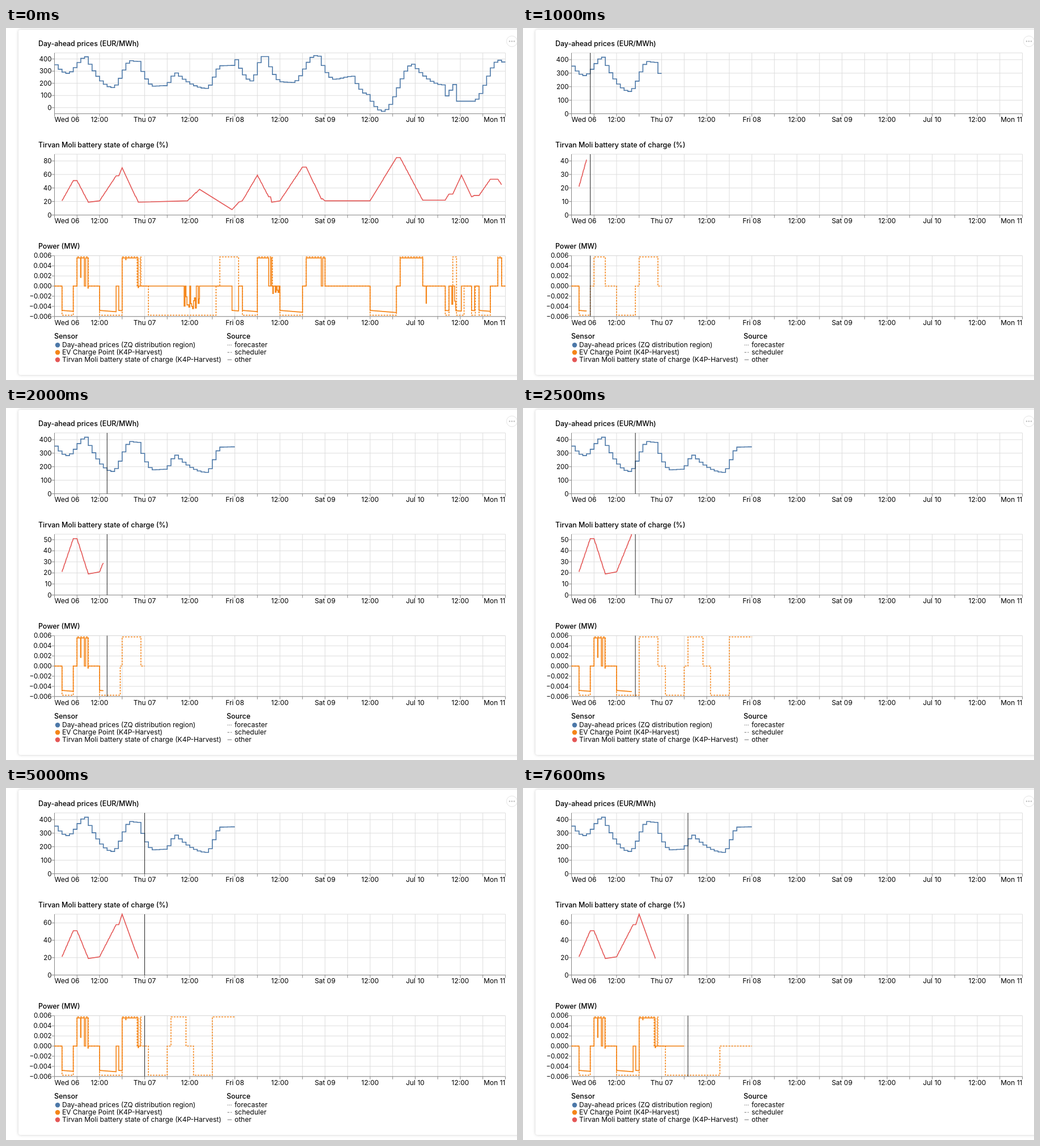
Animation, 901 px wide and 622 px high, one loop 8 s. Source, as an HTML page:

```html
<!DOCTYPE html>
<html lang="en">
<head>
<meta charset="utf-8">
<title>Charging schedule</title>
<style>
  html, body { margin: 0; width: 100%; height: 100%; overflow: hidden; background: #fff; }
  svg { display: block; width: 100%; height: 100%; overflow: hidden; }
  text { font: 12px Inter, "Open Sans", sans-serif; fill: #000; }
  .num { font-size: 11.5px; }
  .title { font-size: 12.4px; font-weight: 500; }
  .line { fill: none; stroke-width: 1.6; }
  .card { fill: #fff; filter: drop-shadow(0 0 2.5px rgba(0, 0, 0, .2)); }
</style>
</head>
<body>
<svg id="stage" viewBox="0 0 901 622"></svg>
<script>
const LOOP = 8000, WEEK = 120;
const LEFT = 85.5, RIGHT = 880.5, HEIGHT = 107.5, TOPS = [44, 223, 402.3];
const BLUE = '#4c78a8', ORANGE = '#f58518', RED = '#e45756', GRID = '#ddd', AXIS = '#888';
const CAR = 'Tirvan Moli', SITE = 'K4P-Harvest', ZONE = 'ZQ distribution region';
const DAYS = ['Wed 06', 'Thu 07', 'Fri 08', 'Sat 09', 'Jul 10', 'Mon 11'];
const stage = document.getElementById('stage');
const hourX = h => LEFT + (RIGHT - LEFT) * h / WEEK;

// how long the rule rests on each hour, in 100 ms; hours 18 and 19 are skipped
const INTRO = 500;
const HOLDS = [1, 2, ...Array(10).fill(1), 2, 2, 1, 2, 11, 3, 5, 3, 3, 5, 3, 4, 3, 3, 3, 5, 4];

function hourAt(t) {
  if (t < INTRO) return WEEK;
  let i = 0, end = INTRO + HOLDS[0] * 100;
  while (t >= end && i < HOLDS.length - 1) end += HOLDS[++i] * 100;
  return i < 17 ? i + 1 : i + 3;
}

// price peaks and valleys: [hour, EUR/MWh]
const TURNS = [[0, 352], [3, 282], [8, 418], [15, 165], [20, 386], [22, 380], [26, 177], [29, 181],
  [32, 285], [40, 158], [44, 345], [47, 347], [48, 394], [52, 220], [55, 420], [56, 420], [60, 213],
  [63, 207], [69, 428], [70, 423], [74, 234], [79, 258], [83, 108], [87, -30], [95, 357], [103, 187],
  [104, 97], [106, 190], [107, 53], [111, 53], [118, 390], [119, 375]];

// prices climb in an S curve and drop fast at first
function price(h) {
  const i = Math.max(1, TURNS.findIndex(p => p[0] >= h));
  const [h1, p1] = TURNS[i - 1], [h2, p2] = TURNS[i];
  const t = (h - h1) / (h2 - h1);
  const eased = p2 > p1 ? (1 - Math.cos(Math.PI * t)) / 2 : 1 - (1 - t) ** 1.8;
  return p1 + (p2 - p1) * eased;
}

// battery sessions: [start hour, end hour, percent at the end, driving]
const RESERVE = 21;
const SESSIONS = [[2, 5, 51], [6, 9, 19], [12, 16.4, 58], [17.1, 18, 70], [18, 22.3, 19],
  [35.4, 38.6, 38], [38.6, 47.25, 8, true], [47.25, 49, 19], [50, 54, 59], [54, 57, 27], [57.5, 57.8, 19],
  [60, 66, 71], [67, 71, 24], [71.4, 72, 21], [84, 91, 85], [92, 98, 22], [104, 105, 31], [106, 108.3, 59],
  [108.3, 111, 27, true], [111, 111.8, 29], [113, 116, 53], [118, 119, 45]];

// whole percents while the battery works; an idle battery settles at its reserve
const socLine = [];
let level = RESERVE, idleFrom = -1;
for (const s of SESSIONS) {
  const [start, end, target, driving] = s;
  if (start - idleFrom >= 1) level = Math.max(level, RESERVE);
  s.up = target > level;
  socLine.push([start, level]);
  if (!driving)
    for (let h = start + 1 / 6; h < end - .1; h += 1 / 6)
      socLine.push([h, Math.round(level + (target - level) * (h - start) / (end - start))]);
  socLine.push([end, target]);
  level = target;
  idleFrom = end;
}

function random(n) {
  const r = Math.sin(n * 12.9898) * 43758.5453;
  return r - Math.floor(r);
}

// short dropouts: [hour, length, kW]; flicker: [start, end, deepest kW]
const DROPS = [[6.95, .1, 1.7], [7.95, .35, 0], [8.9, .1, -.4], [18.95, .1, 5.2], [22.25, .15, -.3], [98.9, .1, -3.4]];
const FLICKER = [[34.5, 38.6, -4.8], [58.1, 59.9, -2], [105.3, 106.8, -4.9]];

function power(h) {
  const drop = DROPS.find(([at, len]) => h >= at && h < at + len);
  if (drop) return drop[2];
  const noisy = FLICKER.find(([from, to]) => h >= from && h < to);
  if (noisy) {
    const r = random(Math.floor(h * 4));
    return r < .4 ? 0 : noisy[2] * r;
  }
  const s = SESSIONS.find(([from, to]) => h >= from && h < to);
  if (!s || s[3]) return 0;
  return s.up ? -4.8 - .06 * (h - s[0]) : 5.55;
}

// planned slots as known at hour `now`: [start, end, kW]
function slots(now) {
  const max = 5.75;
  const list = [[2, 5, -max], [6, 9, max], [12, now < 12 ? 17 : now < 17 ? 17.5 : 18, -max]];
  if (now < 18) list.push([18, 23, max]);
  else list.push([18, 22, max], [22.8, 23, max]);
  if (now === WEEK) {
    list.push([25, 43, -max], [44, 49, max], [106, 107, max]);
    for (const s of SESSIONS)
      if (s[0] >= 50 && !s[3]) list.push([Math.floor(s[0]), Math.ceil(s[1]), s.up ? -max : max]);
  } else if (now >= 31) list.push([25, 39.5, -max]);
  else {
    if (now < 25) list.push([25, 30, -max], [31, 35, max]);
    else list.push([25, Math.min(now + 6, 33), -max]);
    list.push([37, 42, -max], [42, 48, max]);
  }
  return list;
}

// staircase through f, sampled `rate` times an hour
function stairs(f, y, hours, rate) {
  let last = f(0), d = `M${LEFT} ${y(last)}`;
  for (let i = 1; i < hours * rate; i++) {
    const v = f(i / rate);
    if (v !== last) d += `H${hourX(i / rate)}V${y(v)}`;
    last = v;
  }
  return d + `H${hourX(hours)}`;
}

function tickStep(span, count) {
  const raw = span / count, unit = 10 ** Math.floor(Math.log10(raw)), r = raw / unit;
  return unit * (r >= Math.sqrt(50) ? 10 : r >= Math.sqrt(10) ? 5 : r >= Math.SQRT2 ? 2 : 1);
}

function scale(values, top) {
  let lo = -1, hi = 1, step = 2;
  if (values.length) {
    lo = Math.min(0, ...values);
    hi = Math.max(0, ...values);
    const nice = tickStep(hi - lo, 10);
    lo = Math.floor(lo / nice) * nice;
    hi = Math.ceil(hi / nice) * nice;
    step = tickStep(hi - lo, 4);
  }
  const ticks = [];
  for (let v = Math.ceil(lo / step) * step; v <= hi; v += step) ticks.push(v);
  return { ticks, y: v => top + HEIGHT * (hi - v) / (hi - lo) };
}

const line = (x1, y1, x2, y2, color, dash = '') =>
  `<path d="M${x1} ${y1}L${x2} ${y2}" stroke="${color}" stroke-dasharray="${dash}"/>`;
const text = (x, y, s, anchor = 'start', cls = '') =>
  `<text x="${x}" y="${y}" text-anchor="${anchor}" class="${cls}">${s}</text>`;
const curve = (d, color, dash = '') =>
  `<path class="line" d="${d}" stroke="${color}" stroke-dasharray="${dash}"/>`;

function frame(title, top, { ticks, y }, format = String) {
  const bottom = top + HEIGHT;
  let s = text(57, top - 12.5, title, 'start', 'title') + line(LEFT, top, RIGHT, top, GRID);
  for (const v of ticks) {
    s += line(LEFT, y(v), RIGHT, y(v), GRID) + line(LEFT - 5, y(v), LEFT, y(v), AXIS);
    s += text(80.5, y(v) + 4, format(v), 'end', 'num');
  }
  for (let h = 0; h <= WEEK; h += 6) {
    const x = hourX(h);
    s += line(x, top, x, bottom, GRID) + line(x, bottom, x, bottom + 5, AXIS);
    if (h % 12) continue;
    const anchor = h === 0 ? 'start' : h === WEEK ? 'end' : 'middle';
    s += text(x, bottom + 14.8, h % 24 ? '12:00' : DAYS[h / 24], anchor);
  }
  return s + line(LEFT, bottom, RIGHT, bottom, AXIS) + line(LEFT, top, LEFT, bottom, AXIS);
}

function legend(hasSoc) {
  const sensors = [[BLUE, `Day-ahead prices (${ZONE})`], [ORANGE, `EV Charge Point (${SITE})`]];
  if (hasSoc) sensors.push([RED, `${CAR} battery state of charge (${SITE})`]);
  const sources = [['forecaster', '1.6 1.4'], ['scheduler', '3.4 2'], ['other', '']];
  const x = hasSoc ? 389 : 342, rowY = i => 560.2 + 13 * i;
  let s = text(85, 549, 'Sensor', 'start', 'title') + text(x, 549, 'Source', 'start', 'title');
  sensors.forEach(([color, label], i) => {
    s += `<circle cx="91" cy="${rowY(i)}" r="4.2" fill="${color}"/>` + text(99, rowY(i) + 4, label);
  });
  sources.forEach(([label, dash], i) => {
    s += line(x + 1.5, rowY(i), x + 9, rowY(i), '#777', dash) + text(x + 14, rowY(i) + 4, label);
  });
  return s;
}

const card = '<rect class="card" x="22" y="3" width="900" height="610" rx="4"/>';
const menu = '<circle cx="892" cy="23.5" r="9.5" fill="#fff" stroke="#e4e4e4"/>' +
  [888, 892, 896].map(x => `<circle cx="${x}" cy="23.5" r="1.2" fill="#bbb"/>`).join('');

function draw(now) {
  const all = now === WEEK;
  const measured = all ? WEEK : now - 1;
  const priced = all ? WEEK : now < 13 ? 24 : 48;
  const planned = all ? WEEK : now < 15 ? 24 : 48;
  const soc = socLine.filter(p => p[0] <= measured);
  const list = slots(now);
  const plan = h => (list.find(([from, to]) => h >= from && h < to) || [0, 0, 0])[2];

  const a = scale(Array.from({ length: priced }, (_, h) => price(h)), TOPS[0]);
  const b = scale(soc.map(p => p[1]), TOPS[1]);
  const c = scale([-6, 6], TOPS[2]);
  const milli = v => (v < 0 ? '\u2212' : '') + (Math.abs(v) / 1000).toFixed(3);

  let s = card + frame('Day-ahead prices (EUR/MWh)', TOPS[0], a);
  s += curve(stairs(price, a.y, priced, 1), BLUE);
  s += frame(`${CAR} battery state of charge (%)`, TOPS[1], b);
  s += curve(soc.map(([h, v], i) => `${i ? 'L' : 'M'}${hourX(h)} ${b.y(v)}`).join(''), RED);
  s += frame('Power (MW)', TOPS[2], c, milli);
  s += curve(stairs(plan, c.y, planned, 20), ORANGE, '3 2');
  if (measured) s += curve(stairs(power, c.y, measured, 20), ORANGE);
  if (!all) for (const top of TOPS) s += line(hourX(now), top, hourX(now), top + HEIGHT, '#222');
  stage.innerHTML = s + legend(soc.length > 0) + menu;
}

let shown;
function tick() {
  const now = hourAt(performance.now() % LOOP);
  if (now !== shown) draw(shown = now);
  requestAnimationFrame(tick);
}
tick();
</script>
</body>
</html>
```
